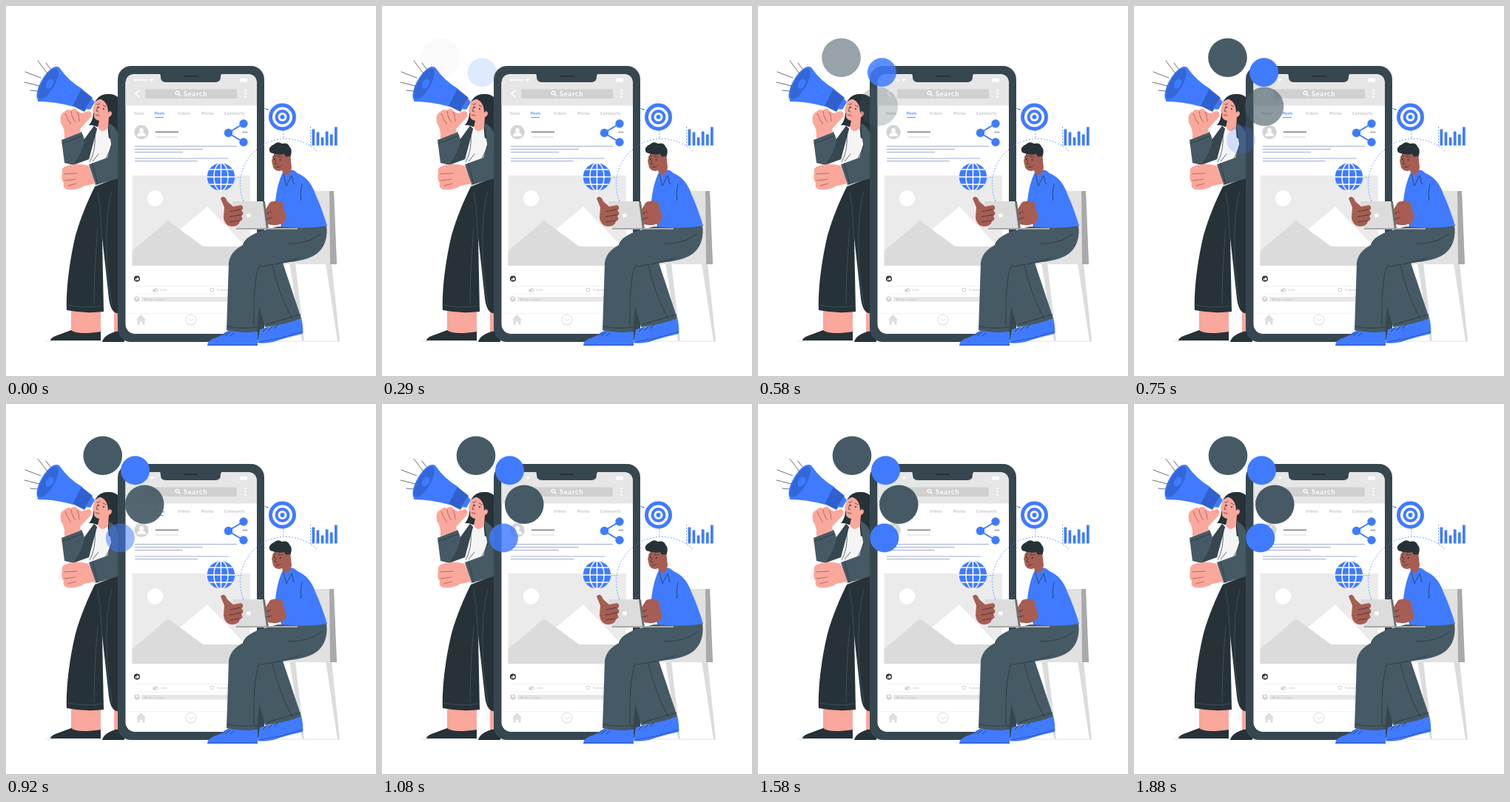
Animation of 500 by 500 pixels, one loop 1.93 s. Source, as an HTML page:

```html
<!DOCTYPE html>
<html lang="en">
<head>
<meta charset="utf-8">
<title>Social campaign</title>
<style>
  html, body { margin: 0; width: 100%; height: 100%; overflow: hidden; background: #fff; }
  svg { display: block; width: 100%; height: 100%; }
  text { font-family: Lato, "Open Sans", sans-serif; }
  .blue { fill: #407bff; }
  .slate { fill: #455a64; }
  .dark { fill: #263238; }
  .skin { fill: #faa79c; }
  .brown { fill: #a65d52; }
  .line { fill: none; stroke: #263238; stroke-width: .7; stroke-linecap: round; }
  .soft { fill: none; stroke: #d9d9d9; stroke-width: 1; }
  .dash { fill: none; stroke: #407bff; stroke-width: .7; stroke-dasharray: 2 2; }
</style>
</head>
<body>
<svg viewBox="0 0 500 500">
  <path d="M53 453H451" stroke="#d5d5d5" stroke-width=".7"/>

  <g id="chair">
    <path d="M383 347h8l12 105h-3zM432 347h8l11 106h-3z" fill="#dcdcdc"/>
    <path d="M386 250h57l4 99h-80l8-14z" fill="#e1e1e1"/>
    <path d="M437 250h6l4 99h-9z" fill="#a9a9a9"/>
  </g>

  <g id="speaker">
    <path class="dark" d="M121 128Q127 118 140 119Q152 121 153 133V187L137 177Q126 160 112 161Q119 153 118 140z"/>
    <path class="skin" d="M88 412h40v30q-17 5-40 0zM146 413h8v30h-8z"/>
    <path class="dark" d="M88 438q8 7 40 2v12H60q1-5 12-8zM130 454q2-9 18-14l12-2v16z"/>
    <path class="dark" d="M120 244L155 230V415H149Q141 412 139 395L130 313L132 413Q107 416 82 411C81 375 88 335 94 310C101 285 111 262 120 244z"/>
    <path d="M124 251Q130 290 129 315M143 250Q133 285 137 360L143 405M124 300Q119 355 119 404M83 404Q108 409 131 405" fill="none" stroke="#455a64" stroke-width=".7"/>
    <path fill="#f5f5f5" d="M121 164L137 159L140 190L133 210L115 209z"/>
    <path class="skin" d="M120 130Q133 119 142 134L139 150L138 164Q130 174 124 164L126 155Q118 154 119 146L117 141z"/>
    <path class="dark" d="M124 125Q138 127 138 145Q143 136 146 143Q147 151 140 153L143 161L155 170V127Q145 114 128 122z"/>
    <path class="skin" d="M138 144q5-4 5 2q-2 5-6 4z"/>
    <path class="line" d="M123 133l4-1M131 134l4 2M124 136l-2 6 3 1M121 147l5 1"/>
    <circle cx="125" cy="137" r="1" class="dark"/><circle cx="132" cy="139" r="1" class="dark"/>
    <path class="slate" d="M75 181L102 170L106 180L119 162L123 166L112 207L91 215L79 212z"/>
    <path d="M106 180L119 162L123 166L112 207L91 214Q104 198 106 180z" fill="#37474f"/>
    <path class="slate" d="M138 158Q149 162 154 178V232L121 242L112 214L137 205L142 187z"/>
    <path class="line" d="M76 186l28-11M113 211Q122 196 120 171M117 213l7 28M135 206l8-17M125 200l-8 10"/>
    <g id="megaphone">
      <path class="blue" d="M69 82L72 83Q84 101 103 112L91 136Q66 129 43 129Q41 119 50 101Q59 84 69 82z"/>
      <ellipse cx="57" cy="105" rx="26" ry="10" transform="rotate(-60 57 105)" class="blue"/>
      <ellipse cx="57" cy="105" rx="23.500" ry="8.500" transform="rotate(-60 57 105)" fill="#3367d8"/>
      <ellipse cx="59" cy="105" rx="7" ry="4.500" transform="rotate(-60 59 105)" class="blue"/>
      <path d="M102 112L117 124L106 143L90 135z" fill="#2f60ce"/>
      <path d="M116 125l4 5-6 10-7-1z" class="blue"/>
      <path class="line" d="M25 103l20 5M26 89l21 8M33 114l9 1M43 74l13 17M54 77l6 8"/>
    </g>
    <path class="skin" d="M74 158Q72 145 79 143Q83 138 88 141Q93 136 97 142L102 145L112 142Q118 144 114 151L100 166L101 171L79 179Q80 166 74 158z"/>
    <path class="skin" d="M76 225Q74 217 86 215Q98 212 112 216L121 240L106 243Q96 250 83 248Q76 246 78 239Q74 235 76 225z"/>
    <path d="M80 145q3 9 8 15M88 142q1 10 6 15M96 143q3 5 3 13M78 227l18-1M79 236l15-2M83 243l12-3" fill="none" stroke="#a65c58" stroke-width=".8"/>
  </g>

  <g id="phone">
    <rect x="151" y="81" width="198" height="373" rx="18" fill="#37474f"/>
    <rect x="161.500" y="92" width="177.500" height="351" rx="13" fill="#fff"/>
    <path d="M161.500 134.500V105Q161.500 92 174.500 92H326Q339 92 339 105V134.500z" fill="#e6e6e6"/>
    <path d="M207 91h86q-3 1-3 5 0 7-7 7h-67q-7 0-7-7 0-4-2-5z" fill="#37474f"/>
    <path d="M241 95h18" stroke="#263238" stroke-width="2" stroke-linecap="round"/>
    <path d="M173 100h17" stroke="#fff" stroke-width="2.500" stroke-dasharray="2.500 1.200"/>
    <path d="M194 99q3-2 6 0l-3 3z" fill="#fff"/>
    <rect x="316" y="98" width="10" height="4.500" rx="1" fill="#fff"/>
    <path d="M180 114l-5 4.500 5 4.500" fill="none" stroke="#fff" stroke-width="1.500"/>
    <rect x="188" y="112.500" width="124" height="12.500" fill="#d0d0d0"/>
    <circle cx="231.500" cy="117.500" r="2.300" fill="none" stroke="#fff" stroke-width="1.300"/>
    <path d="M233 119l3 3" stroke="#fff" stroke-width="1.300"/>
    <text x="240" y="121.700" font-size="9" font-weight="700" letter-spacing=".9" fill="#fff">Search</text>
    <path d="M323.500 113v11" stroke="#fff" stroke-width="2.200" stroke-dasharray="2.200 2.200"/>
    <g font-size="4.700" letter-spacing=".45" fill="#a6a6a6">
      <text x="173" y="147">Home</text>
      <text x="201" y="147" fill="#407bff" font-weight="700">Posts</text>
      <text x="232" y="147">Videos</text>
      <text x="264" y="147">Photos</text>
      <text x="295" y="147">Community</text>
    </g>
    <path d="M201 150.500h12" stroke="#407bff" stroke-width=".8"/>
    <circle cx="183" cy="170.500" r="9.700" fill="#d4d4d4"/>
    <circle cx="183" cy="168" r="3" fill="#fff"/><path d="M177 176q0-5 6-5t6 5z" fill="#fff"/>
    <path d="M202 170.300h31" stroke="#707783" stroke-width="1.400"/>
    <path d="M202 177h30" stroke="#dedede" stroke-width="1.300"/>
    <path d="M320 170.500h6" stroke="#455a64" stroke-width="1.300" stroke-dasharray="1.300 1"/>
    <path d="M174 189.500h138M174 193.500h92M174 197.500h65M174 206h127M174 209.500h85" stroke="#8b9bcb" stroke-width=".8"/>
    <rect x="170.500" y="229" width="159.500" height="122" fill="#ebebeb"/>
    <circle cx="201.500" cy="260" r="10.700" fill="#fff"/>
    <path d="M235 302l37-31 52 54h-58z" fill="#fff"/>
    <path d="M170.500 331L219 290l47 35h64v26H170.500z" fill="#dbdbdb"/>
    <circle cx="177" cy="368.500" r="4" class="dark"/>
    <path d="M175 368h1v3h-1zM176.500 368l1-2 .8 1.500h1.500l-.5 3h-2.800z" fill="#fff"/>
    <path d="M174 378.500h153M174 389h153" stroke="#eee" stroke-width=".8"/>
    <path d="M199 383h1.500v3H199zM201.500 383l1.500-2v2h2l-.5 3h-3z" fill="none" stroke="#aaa" stroke-width=".6"/>
    <circle cx="278.500" cy="383.500" r="2.300" fill="none" stroke="#aaa" stroke-width=".6"/>
    <g font-size="4" letter-spacing=".5" fill="#b0b0b0"><text x="209" y="385">Like</text><text x="285" y="385">Comment</text></g>
    <circle cx="177" cy="396" r="3.700" fill="#d4d4d4"/><circle cx="177" cy="395" r="1.300" fill="#fff"/>
    <rect x="183" y="393" width="143" height="6.500" fill="#e6e6e6"/>
    <text x="187" y="397.700" font-size="3.300" letter-spacing=".6" fill="#aaa">Write a reply…</text>
    <path d="M162 415.500h177" stroke="#eee" stroke-width=".8"/>
    <path d="M176 424l6.500-7 6.500 7h-1.500v6.500h-3.500v-4h-3v4h-3.500V424z" fill="#dedede"/>
    <circle cx="250" cy="424" r="7" class="soft"/><path d="M246.500 422.500l3.500 3 3.500-3" class="soft"/>
  </g>

  <g id="icons">
    <path class="dash" d="M321 264A61.500 61.500 0 0 1 420 196M375 168v12M309 232h7M349 138l10 4M411.500 163v28"/>
    <path d="M321 159l-21 12.500L321 184" fill="none" stroke="#407bff" stroke-width="2"/>
    <g class="blue"><circle cx="321" cy="159" r="5.700"/><circle cx="300.500" cy="171.500" r="5.700"/><circle cx="321" cy="184" r="5.700"/></g>
    <circle cx="290.500" cy="231" r="18.700" class="blue"/>
    <g fill="none" stroke="#fff" stroke-width="1.500">
      <path d="M290.500 212v38M271 231h39M275 221h31M275 241h31"/>
      <ellipse cx="290.500" cy="231" rx="9.500" ry="18.700"/>
    </g>
    <g fill="none" stroke="#407bff"><circle cx="373.500" cy="150" r="16" stroke-width="5"/><circle cx="373.500" cy="150" r="8" stroke-width="4"/></g>
    <circle cx="373.500" cy="150" r="3" class="blue"/>
    <path class="line" d="M351 139l3 1"/>
    <g id="bars" class="blue"></g>
  </g>

  <g id="reader">
    <path class="blue" d="M343 437L399 422Q402 433 401 443Q378 448 361 454Q347 457 340 455z"/>
    <path class="slate" d="M341 350L373 344L399 422Q380 430 350 434L342 405z"/>
    <path class="blue" d="M301 438L340 440V459H272Q272 451 287 447z"/>
    <path class="slate" d="M367 298L433 296Q436 320 422 333Q411 343 384 346L345 352Q342 360 344 383L339 440Q319 443 298 438Q300 380 301 347Q303 332 320 323Q322 313 342 305z"/>
    <path class="line" d="M345 352Q374 348 397 340M343 350Q334 366 335 432M360 351Q369 390 387 423M382 321q29 0 43-13M299 433q20 4 40 1M353 430l45-13"/>
    <path class="line" d="M291 446l7-5M296 446l6-5M303 446l5-4M347 440l7-7M355 438l5-5M363 436l4-5" stroke-width="1.300"/>
    <path d="M273 458h67M342 454q30-4 59-14" fill="none" stroke="#2d55b5"/>
    <path class="blue" d="M374 225Q386 217 394 226Q411 233 418 254Q426 271 434 297Q404 302 372 298L364 263Q367 238 374 225z"/>
    <path class="brown" d="M362 200Q373 190 384 199L386 219L382 228Q375 229 373 222Q365 225 361 218L359 209z"/>
    <path class="dark" d="M357 198Q353 191 362 187Q367 182 373 186Q381 184 383 190Q388 195 384 204L382 209L376 200Q367 202 357 198z"/>
    <path class="brown" d="M379 204q5-3 5 2t-5 5z"/>
    <path class="line" d="M360 204l4-1M368 203l5 1M365 208l-2 5 3 1M365 218l6-1M375 227l4 16 7-14 3 12M400 241q-3 12-1 21l-20 3M379 265l5 28"/>
    <circle cx="362.500" cy="207" r="1" class="dark"/><circle cx="370.500" cy="208" r="1" class="dark"/>
    <path class="brown" d="M350 276L357 265Q367 261 378 266L381 289Q369 299 354 295z"/>
    <path class="blue" d="M373 265l24-4 8 29-31 4 5-7z"/>
    <path d="M306 264h42l6 38h-43z" fill="#dcdcdc"/>
    <path d="M347 264h3l5 38h-3z" fill="#727272"/>
    <path d="M311 300h83v2h-83z" fill="#a9a9a9"/>
    <circle cx="328" cy="283" r="2.800" fill="#fff"/>
    <path class="brown" d="M290 260Q295 254 299 264L307 271L318 269Q323 273 318 276Q323 280 318 284Q322 289 316 291Q315 297 306 298Q296 298 294 286L295 272z"/>
    <path class="line" d="M303 278l14-3M302 285l16-3M303 292l12-2M352 281l6-3M352 288l7-2"/>
  </g>

  <g id="badges"></g>
</svg>
<script>
  const LOOP = 1930, SLIDE = 1000;
  const SVG_NS = "http://www.w3.org/2000/svg";

  function add(parentId, tag, attrs) {
    const node = document.createElementNS(SVG_NS, tag);
    for (const key in attrs) node.setAttribute(key, attrs[key]);
    return document.getElementById(parentId).appendChild(node);
  }

  [22, 18, 11, 19, 15, 25].forEach((height, i) =>
    add("bars", "rect", { x: 413.500 + i * 6.100, y: 188.500 - height, width: 3.700, height }));

  const badges = [
    { x: 127, y: 69.700, r: 26.300, color: "#455a64", start: 80, from: 57, fade: 2 },
    { x: 172.500, y: 89.700, r: 19.500, color: "#407bff", start: -20, from: 57, fade: 1.700 },
    { x: 190.300, y: 135.700, r: 26.300, color: "#455a64", start: 315, from: 37, fade: 1 },
    { x: 170.800, y: 181, r: 19.500, color: "#407bff", start: 560, from: 30, fade: .800 }
  ];
  for (const badge of badges) {
    badge.node = add("badges", "circle", { cy: badge.y, r: badge.r, fill: badge.color });
  }

  const bezier = (u, a, b) => 3 * u * (1 - u) ** 2 * a + 3 * u * u * (1 - u) * b + u ** 3;

  // Slow start with a small overshoot before settling.
  function ease(x) {
    if (x <= 0 || x >= 1) return x <= 0 ? 0 : 1;
    let low = 0, high = 1;
    for (let i = 0; i < 24; i++) {
      const mid = (low + high) / 2;
      if (bezier(mid, .36, .5) < x) low = mid; else high = mid;
    }
    return bezier(low, -.01, 1.38);
  }

  function render(time) {
    for (const { node, x, start, from, fade } of badges) {
      const p = ease((time - start) / SLIDE);
      node.setAttribute("cx", x - from * (1 - p));
      node.setAttribute("opacity", Math.min(1, Math.max(0, p)) ** fade);
    }
  }

  const began = performance.now();
  function tick() {
    render((performance.now() - began) % LOOP);
    requestAnimationFrame(tick);
  }
  tick();
</script>
</body>
</html>
```
